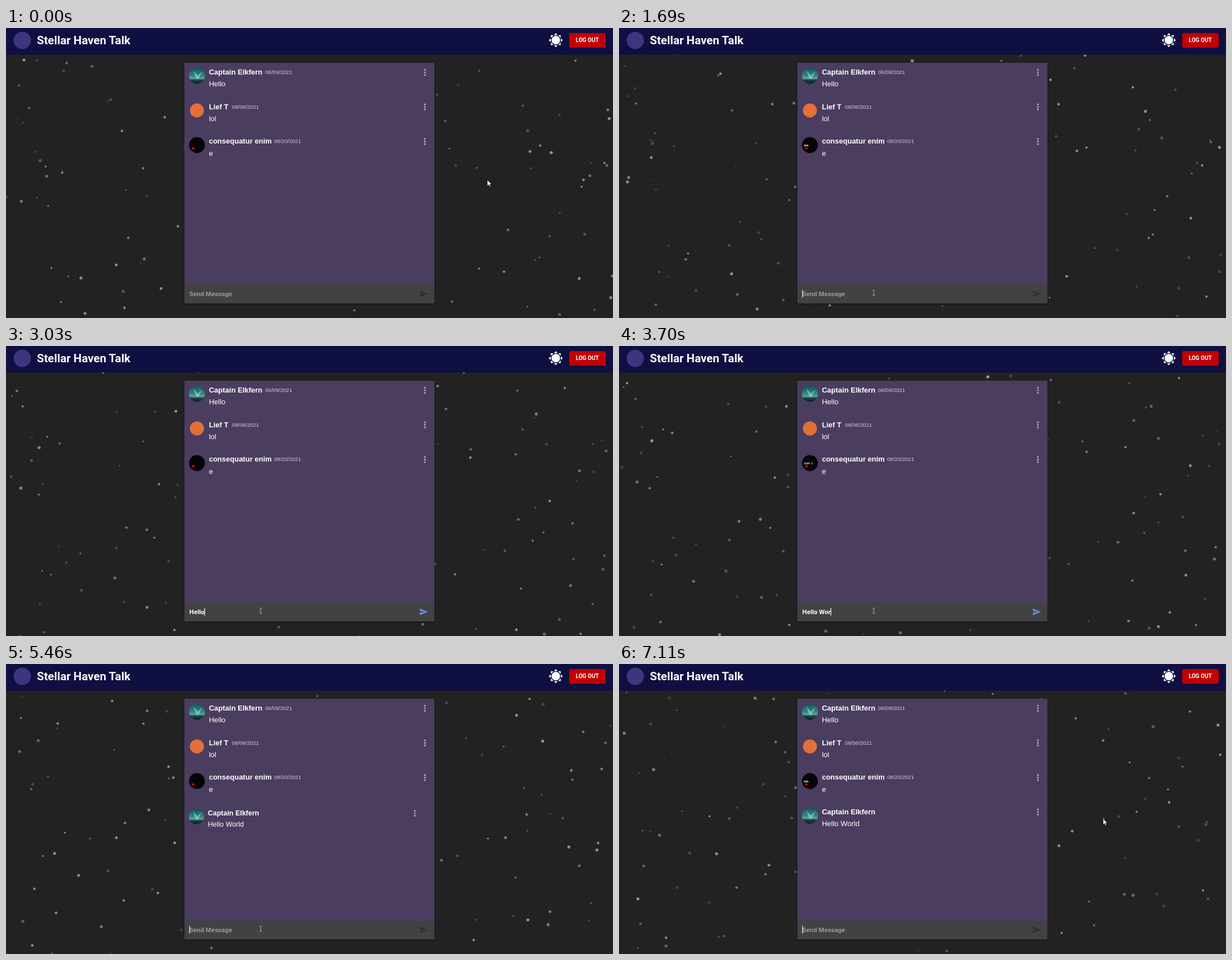
Animation, 1082 px wide and 517 px high, one loop 7160 ms. Source, as an HTML page:

```html
<!DOCTYPE html>
<html lang="en">
<head>
<meta charset="utf-8">
<title>Space chat</title>
<style>
  html, body { margin: 0; width: 100%; height: 100%; overflow: hidden; background: #222; }
  svg { display: block; width: 1082px; height: 517px; }
  text { white-space: pre; fill: #fff; font: 13px "Liberation Sans", Arial, sans-serif; }
  .name { font-weight: 700; }
  .date { font-size: 9.6px; fill: #d2cdd8; }
  .ui { font-family: Roboto, sans-serif; font-weight: 700; font-size: 11.5px; }
  .dots { fill: #b4adc0; }
</style>
</head>
<body>
<svg viewBox="0 0 1082 517">
  <defs>
    <linearGradient id="aurora" x2="0" y2="1">
      <stop offset="0" stop-color="#12545a"/>
      <stop offset=".5" stop-color="#2f8886"/>
      <stop offset=".66" stop-color="#5fa5a0"/>
      <stop offset=".76" stop-color="#1b4348"/>
      <stop offset="1" stop-color="#0d1c22"/>
    </linearGradient>
    <filter id="shadow"><feDropShadow dx="0" dy="1" stdDeviation="1.5" flood-opacity=".45"/></filter>
  </defs>

  <g id="stars" fill="#b4b4b4"></g>

  <rect width="1082" height="47.4" fill="#0f0f41"/>
  <circle cx="29" cy="22" r="15.5" fill="#3c357f"/>
  <text class="ui" x="55" y="28.7" style="font-size:20.6px">Stellar Haven Talk</text>
  <g id="sun" transform="translate(980 21.7)" fill="#fff"><circle r="7.6"/></g>
  <rect x="1004" y="9" width="65" height="26" rx="3" fill="#c10000"/>
  <text class="ui" x="1036.2" y="25" text-anchor="middle" style="font-size:10.1px">LOG OUT</text>

  <g filter="url(#shadow)">
    <rect x="318" y="62" width="445.6" height="396" fill="#4c3d5f"/>
    <rect x="318" y="457.2" width="445.6" height="33.8" fill="#434343"/>
  </g>
  <g id="rows"></g>
  <text id="sign" x="329.5" y="210.8" style="font:700 4.4px 'DejaVu Sans Mono',monospace"></text>
  <path d="M333.8 211.5l3 4.6h-6z" fill="#e01010"/>

  <text id="hint" class="ui" x="326.8" y="477.7" style="fill:#989898">Send Message</text>
  <text id="typed" class="ui" x="326.8" y="477.7"></text>
  <rect id="caret" y="467" width="1.2" height="13.5" fill="#fff"/>
  <path id="send" transform="translate(736.4 465.6) scale(.69)" d="M2 21L23 12 2 3v7l15 2-15 2z"/>

  <path id="arrow" d="M0 0v10.4l2.4-2.2 1.6 3.5 1.8-.8-1.6-3.4h3.3z" fill="#fff" stroke="#111" stroke-width=".6"/>
  <path id="beam" d="M-2-4.5h1.5L0-4l.5-.5H2M0-4v8M-2 4.5h1.5L0 4l.5.5H2" fill="none" stroke="#c4c4c4" stroke-width=".9"/>
</svg>
<script>
const LOOP = 7160, SENT = 5060, MESSAGE = 'Hello World';
const $ = id => document.getElementById(id);
const clamp = v => Math.max(0, Math.min(1, v));
const ease = (t, start, length) => {
  const v = clamp((t - start) / length);
  return v * v * (3 - 2 * v);
};
const show = (el, on) => el.style.display = on ? '' : 'none';

function add(parent, tag, attrs, text = '') {
  const el = document.createElementNS('http://www.w3.org/2000/svg', tag);
  for (const key in attrs) el.setAttribute(key, attrs[key]);
  el.textContent = text;
  return parent.appendChild(el);
}

let seed = 41;
const random = (min, max) => min + (max - min) * (seed = seed * 16807 % 2147483647) / 2147483647;

// Stars drift upwards; the field reaches below the stage so new ones rise in
const stars = Array.from({ length: 170 }, () => ({
  x: random(0, 1082), y: random(50, 690),
  vx: random(-9, 9), vy: random(-28, -13),
  phase: random(0, 2 * Math.PI),
  el: add($('stars'), 'circle', { r: 0.8 + 2 * Math.sqrt(random(0, 1)) })
}));

for (let a = 0; a < 360; a += 45)
  add($('sun'), 'path', { d: 'M-3.2-9L0-12.6 3.2-9z', transform: `rotate(${a})` });

function addRow(i, name, message, color, date = '', dateX = 0, r = 14.2) {
  const y = 79 + i * 61.7, row = add($('rows'), 'g', {});
  add(row, 'circle', { cx: 340.3, cy: y + 6.3, r, fill: color });
  if (color.startsWith('url'))
    add(row, 'path', { d: `M334 ${y - 3}l5 14 4 1 7-14-8 8z`, fill: '#a9cfc8', opacity: 0.65 });
  add(row, 'text', { class: 'name', x: 361.7, y: y + 4 }, name);
  add(row, 'text', { class: 'date', x: dateX, y: y + 3 }, date);
  add(row, 'text', { x: 361.7, y: y + 25.3 }, message);
  for (const d of [-4.5, 0, 4.5]) add(row, 'circle', { class: 'dots', cx: 746.7, cy: y + d, r: 1.6 });
  return row;
}
addRow(0, 'Captain Elkfern', 'Hello', 'url(#aurora)', '06/09/2021', 462);
addRow(1, 'Lief T', 'lol', '#e2703c', '08/06/2021', 402.8, 12.5);
addRow(2, 'consequatur enim', 'e', '#060506', '08/20/2021', 478);
const newRow = addRow(3, 'Captain Elkfern', MESSAGE, 'url(#aurora)');

// Two bursts of typing, one per word
const keyTime = i => i < 5 ? 2260 + i * 135 : 3150 + (i - 5) * 170;

function drawInput(t) {
  let count = 0;
  if (t < SENT) while (count < MESSAGE.length && keyTime(count) <= t) count++;
  $('typed').textContent = MESSAGE.slice(0, count);
  show($('hint'), !count);
  $('send').setAttribute('fill', count > 1 ? '#7187dc' : '#303030');
  const last = t >= SENT ? SENT : count ? keyTime(count - 1) : 1300;
  show($('caret'), t >= last && (t - last) % 1000 < 500);
  $('caret').setAttribute('x', 326.6 + (count ? $('typed').getComputedTextLength() : 0));
}

function drawPointer(t) {
  const go = ease(t, 250, 700), settle = ease(t, 1100, 300), back = ease(t, 6250, 700);
  const x = 858 - 397 * go - 7 * settle + 409 * back;
  const y = 271 + 197.5 * go + 3.5 * settle - 196 * back;
  const inField = x > 318 && x < 730 && y > 458 && y < 491;
  show($('arrow'), !inField);
  show($('beam'), inField);
  $(inField ? 'beam' : 'arrow').setAttribute('transform', `translate(${x} ${y})`);
}

function drawSign(t) {
  const p = t % 2730;
  const [text, start] = p < 1350 ? ['STOP IT.', 700] : ['NOW.', 1350];
  $('sign').textContent = p < 2000 ? text.slice(0, Math.max(0, Math.floor((p - start) / 40))) : '';
}

function drawStars(t) {
  for (const s of stars) {
    s.el.setAttribute('cx', s.x + s.vx * t / 1000);
    s.el.setAttribute('cy', s.y + s.vy * t / 1000);
    s.el.setAttribute('opacity', 0.48 + 0.27 * Math.sin(t / 900 + s.phase));
  }
}

function drawNewRow(t) {
  const scale = 1 - (1 - clamp((t - SENT) / 615)) ** 3;
  show(newRow, t >= SENT);
  newRow.setAttribute('transform', `translate(318 311) scale(${scale}) translate(-318 -311)`);
}

const begin = performance.now();
function tick() {
  const t = (performance.now() - begin) % LOOP;
  for (const draw of [drawStars, drawInput, drawPointer, drawSign, drawNewRow]) draw(t);
  requestAnimationFrame(tick);
}
tick();
</script>
</body>
</html>
```
